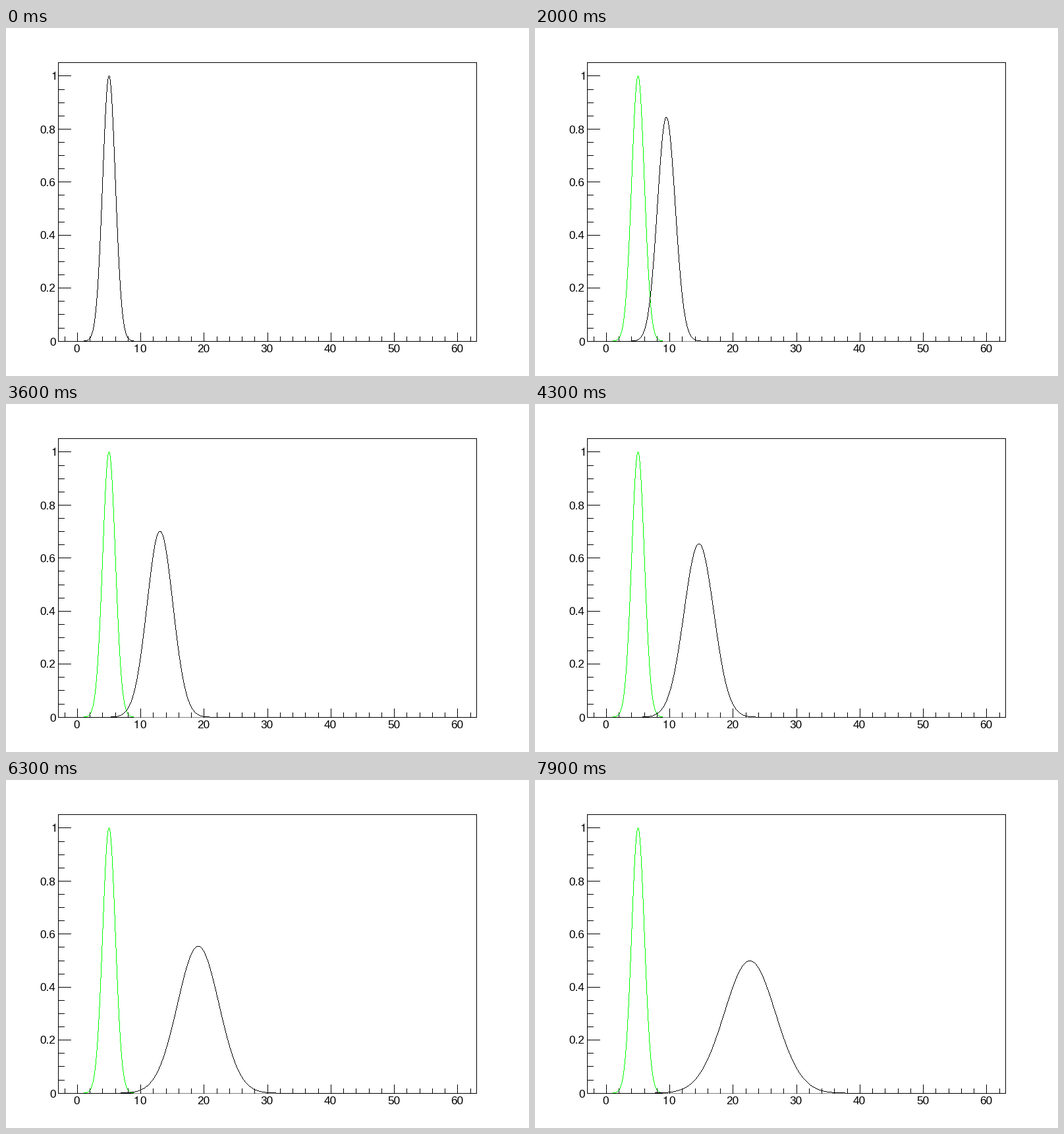
Write a matplotlib script that moves like this. It is 794 px wide and 528 px high and loops after 8000 ms.

```python
import numpy as np
import matplotlib.pyplot as plt
from matplotlib.animation import FuncAnimation
from matplotlib.collections import PolyCollection
from matplotlib.patches import Polygon

W, H, DPI = 794, 528, 100
PX = 72 / DPI                    # one pixel in points
FRAMES, INTERVAL = 80, 100
X0, XUNIT = 108.3, 9.6245        # data origin and scale in pixels
Y0, YUNIT = 475.2, 402.3
LEFT, RIGHT, TOP, BOTTOM = 79, 714, 52, 475
EM = 17.26                       # label size in pixels
SPEED, SPREAD = 0.2234, 0.0493   # drift and dispersion per step

plt.rcParams["font.family"] = "Liberation Sans"
fig = plt.figure(figsize=(W / DPI, H / DPI), dpi=DPI, facecolor="white")
ax = fig.add_axes([0, 0, 1, 1])
ax.set_xlim(0, W)
ax.set_ylim(H, 0)
ax.axis("off")


def to_px(x):
    return np.floor(X0 + XUNIT * np.asarray(x))


def to_py(y):
    return np.floor(Y0 - YUNIT * np.asarray(y))


def stroke(xs, ys, color="black", z=2):
    line, = ax.plot(xs, ys, color=color, lw=PX, antialiased=False, snap=False,
                    solid_capstyle="butt", zorder=z)
    return line


def hline(y, x0, x1, **kw):
    return stroke([x0, x1 + 1], [y + 0.5] * 2, **kw)


def vline(x, y0, y1, **kw):
    return stroke([x + 0.5] * 2, [y0, y1 + 1], **kw)


def label(text, x, base, ha):
    ax.text(x, base, text, fontsize=EM * PX, ha=ha, va="baseline")


def one(x, base):
    """Digit 1 without a foot, its origin at x."""
    pts = np.array([(.259, 0), (.347, 0), (.347, .709), (.289, .709),
                    (.265, .635), (.215, .59), (.102, .568),
                    (.102, .505), (.259, .505)])
    ax.add_patch(Polygon(np.c_[x + EM * pts[:, 0], base - EM * pts[:, 1]],
                         fc="black", lw=0))


def draw_axes():
    hline(TOP, LEFT, RIGHT)
    hline(BOTTOM, LEFT, RIGHT, z=1)
    vline(LEFT, TOP, BOTTOM)
    vline(RIGHT, TOP, BOTTOM)

    for v in range(-2, 63, 2):
        vline(to_px(v), 462 if v % 10 == 0 else 468, BOTTOM)
    for i in range(21):
        hline(to_py(i / 20), LEFT, 98 if i % 4 == 0 else 88)

    base = 492
    for v in range(0, 61, 10):
        mid = X0 + XUNIT * v - 0.7
        if v == 10:
            start = mid - 0.583 * EM
            one(start, base)
            label("0", start + 0.834 * EM, base, "center")
        else:
            label(str(v), mid, base, "center")
    for i in range(5):
        label(f"{i / 5:g}", 75.5, to_py(i / 5) + 6.5, "right")
    one(75 - 0.347 * EM, to_py(1) + 6.5)


cols = np.arange(LEFT, RIGHT + 1)
# several samples across each pixel column, both edges included
data_x = (cols[:, None] + np.linspace(0, 1, 9) - X0) / XUNIT


def packet(n):
    """Columns and pixel runs where the spreading packet is off the axis."""
    width2 = 1 + (SPREAD * n) ** 2
    d = data_x - 5 - SPEED * n
    rows = to_py(width2 ** -0.25 * np.exp(-d ** 2 / (2 * width2)))
    top = rows.min(axis=1)
    bottom = np.maximum(rows.max(axis=1), top + 1)
    up = top < BOTTOM
    return cols[up], top[up], bottom[up]


def curve(color, z):
    runs = PolyCollection([], facecolors=color, linewidths=0,
                          antialiaseds=False, zorder=z)
    return ax.add_collection(runs, autolim=False)


def show(runs, x, top, bottom):
    xs = np.stack([x, x + 1, x + 1, x], axis=1)
    ys = np.stack([top, top, bottom, bottom], axis=1)
    runs.set_verts(np.stack([xs, ys], axis=2))


draw_axes()
trail = curve("#00ff00", 3)
wave = curve("black", 4)
base_line = stroke([], [], color="#808080", z=1.5)
start = packet(0)
show(trail, *start)
foot = start[0].max() + 1


def update(n):
    x, top, bottom = packet(n)
    show(wave, x, top, bottom)
    x0, x1 = max(foot, x.min()), x.max() + 1
    if x1 > x0:
        base_line.set_data([x0, x1], [BOTTOM + 0.5] * 2)
    else:
        base_line.set_data([], [])
    return base_line, trail, wave


anim = FuncAnimation(fig, update, frames=FRAMES, interval=INTERVAL,
                     repeat=True, repeat_delay=0, blit=False)
plt.show()
```
